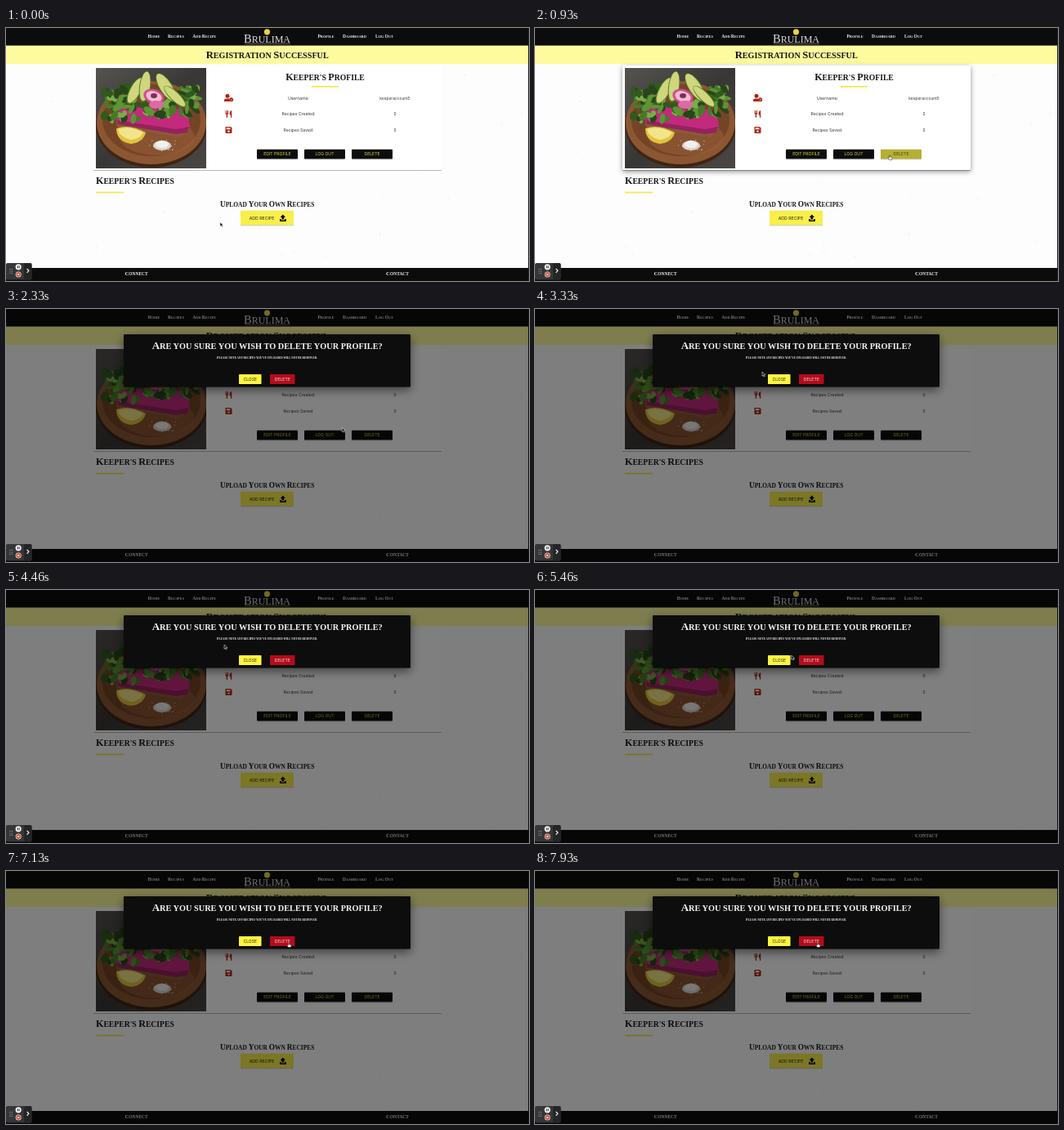
An HTML page that plays this animation: 640x310 px, repeating every 8000 ms.

```html
<!DOCTYPE html>
<html lang="en">
<head>
<meta charset="utf-8">
<title>Profile page</title>
<style>
html, body { margin: 0; width: 100%; height: 100%; overflow: hidden; background: #fdfdfd; }
svg { display: block; width: 640px; height: 310px; }
.serif { font-family: "Liberation Serif", serif; font-weight: bold; }
.sans { font-family: Inter, sans-serif; }
</style>
</head>
<body>
<svg id="stage" viewBox="0 0 640 310" xmlns="http://www.w3.org/2000/svg"></svg>
<script>
const YELLOW = '#f8ef4c', INK = '#0c0c0c', RED = '#b0240f';
const LOOP = 8000, OPEN = 1790;

let seed = 11;
const rnd = () => (seed = seed * 16807 % 2147483647) / 2147483647;
const many = (n, f) => Array.from({ length: n }, (_, i) => f(i)).join('');

const rect = (x, y, w, h, fill, more = '') =>
  `<rect x="${x}" y="${y}" width="${w}" height="${h}" fill="${fill}" ${more}/>`;
const oval = (x, y, rx, ry, fill, more = '') =>
  `<ellipse cx="${x}" cy="${y}" rx="${rx}" ry="${ry}" fill="${fill}" ${more}/>`;
const path = (d, fill, more = '') => `<path d="${d}" fill="${fill}" ${more}/>`;
const sans = (s, x, y, size, fill = '#333', more = '') =>
  `<text class="sans" x="${x}" y="${y}" font-size="${size}" fill="${fill}" text-anchor="middle" ${more}>${s}</text>`;

// Small capitals: capitals keep the full size, the rest is set smaller
const caps = (s, x, y, size, fill = '#161616', anchor = 'middle') => {
  const parts = s.match(/[A-Z]|[^A-Z]+/g).map(p => /[A-Z]/.test(p) ? p
    : `<tspan font-size="${(size * .8).toFixed(2)}">${p.toUpperCase()}</tspan>`);
  return `<text class="serif" x="${x}" y="${y}" font-size="${size}" fill="${fill}" text-anchor="${anchor}">${parts.join('')}</text>`;
};
const button = (s, x, y, w, h, bg, fg, id = '') =>
  rect(x, y, w, h, bg, `rx=".8" filter="url(#low)" ${id && `id="${id}"`}`) +
  sans(s, x + w / 2, y + h / 2 + 1.9, 5.1, fg, id && `id="${id}Text"`);

function texture() {
  return many(150, () => {
    const x = rnd() * 638, y = 46 + rnd() * 246, a = rnd() * 6.3, l = .4 + rnd() * rnd() * 5;
    return path(`M${x} ${y}l${Math.cos(a) * l} ${Math.sin(a) * l}`, 'none',
      `stroke="#999" stroke-width=".4" opacity="${.12 + rnd() * .3}"`);
  });
}

function photo() {
  const greens = ['#2f5a1c', '#477a28', '#5d9434', '#79ad48', '#26461a'];
  const leaves = (n, x, y, w, h) => many(n, i => {
    const cx = x + (rnd() - .5) * w, cy = y + (rnd() - .5) * h;
    return oval(cx, cy, 3 + rnd() * 5, 2 + rnd() * 2.5, greens[i % 5],
      `transform="rotate(${rnd() * 180} ${cx} ${cy})"`);
  });
  const slice = (x, y, rx, ry, turn) => `<g transform="translate(${x} ${y}) rotate(${turn})">` +
    oval(0, 0, rx, ry, '#557f2c') + oval(0, -.6, rx - 1, ry - 1, '#cfd67c') + '</g>';
  return `<g clip-path="url(#photo)">` +
    rect(110, 49, 135, 123, 'url(#table)') +
    oval(178, 119, 68, 52, '#3f2414') + oval(178, 116, 67, 51, '#8b5632') +
    oval(178, 113, 60, 44, '#754427') + oval(185, 134, 46, 22, '#965e38', 'opacity=".6"') +
    path('M134 107L146 97L222 104L225 124L213 134L136 121Z', '#8c5a3a') +
    path('M134 105L150 92L222 101L225 122L208 125L135 114Z', '#c32a7d') +
    path('M136 113L208 124L224 121L222 128L208 130L137 118Z', '#96215f') +
    leaves(48, 140, 91, 44, 42) + leaves(30, 216, 92, 37, 36) + leaves(22, 185, 100, 45, 14) +
    slice(158, 77, 7, 18, 28) + slice(170, 72, 7, 19, 8) + slice(196, 73, 8, 20, -32) + slice(207, 84, 6, 18, -46) +
    oval(181, 84, 13, 9, '#d04b91', 'transform="rotate(20 181 84)"') +
    oval(181, 84, 10, 6.5, '#f0bccd', 'transform="rotate(20 181 84)"') +
    oval(184, 94, 9, 5, '#da6ba3') + oval(181, 83, 4, 3, '#7f2b58') +
    path('M135 123Q151 117 171 128Q168 140 153 142Q135 139 135 123Z', '#dfc43c') +
    path('M137 124Q151 119 168 128Q164 136 153 137Q139 134 137 124Z', '#f1e58b') +
    oval(191, 144, 11, 6, '#d9d5d0') + oval(191, 142.5, 8, 4.5, '#f2f0ed') +
    many(22, () => oval(191 + (rnd() - .5) * 32, 144 + (rnd() - .5) * 15, .5, .5, '#eee')) + '</g>';
}

const icons = `<g fill="${RED}">` +
  oval(271, 83.3, 2.5, 2.5, RED) +
  path('M267 90V88.6Q267 86.5 270 86.5H273L275 90Z', RED) +
  oval(275.7, 87.8, 2.5, 2.5, RED) + path('M274.5 87.9l.9.9 1.6-1.8', 'none', 'stroke="#fff" stroke-width=".6"') +
  path('M268.5 101h.8v3h.7v-3h.8v3h.7v-3h.8v3.2q0 1.2-1.2 1.6v3.9h-1.4v-3.9q-1.2-.4-1.2-1.6ZM273.7 104.5q0-3 2.5-3.5v8.7h-1.3v-3.2h-1.2Z', RED) +
  path('M268.5 121H275L276.5 122.5V128Q276.5 129 275.5 129H269.5Q268.5 129 268.5 128Z', RED) +
  rect(269.8, 122.2, 4.6, 2, '#fff') + oval(272.5, 126.6, 1.2, 1.2, '#fff') + '</g>';

const uploadIcon = path('M338.8 228.5L342 232H340.2V234.6H337.4V232H335.6Z', INK) +
  path('M335 234H336.6V235.4H341V234H342.8V237H335Z', INK);

const page = rect(0, 0, 640, 310, '#fdfdfd') + texture() +
  rect(0, 21, 640, 23, '#fdfb9d') + caps('Registration Successful', 319.7, 36.5, 12.7) +
  rect(0, 0, 640, 21.5, INK) +
  [['Home', 181], ['Recipes', 208], ['Add Recipe', 242.7], ['Profile', 391.5], ['Dashboard', 426.5], ['Log Out', 463]]
    .map(([s, x]) => caps(s, x, 12.3, 5.5, '#eee')).join('') +
  oval(319.5, 4.8, 3.6, 3.6, '#f1cf3b') +
  `<text x="319.5" y="18.3" font-family="Liberation Serif, serif" font-size="14.5" fill="#ddd" text-anchor="middle">B<tspan font-size="12">RULIMA</tspan></text>` +
  rect(292, 19.3, 56, .5, '#aaa') +
  rect(107, 46, 426, 128, '#fff', 'id="cardLow" filter="url(#low)"') +
  rect(107, 46, 426, 128, '#fff', 'id="cardHigh" filter="url(#high)"') +
  `<g opacity=".5"><svg x="107" y="46" width="426" height="128" viewBox="107 46 426 128">${texture()}</svg></g>` +
  photo() +
  caps("Keeper's Profile", 390.5, 63.6, 12.1) + rect(374, 71, 33, 1.6, '#f5e63c') + icons +
  [['Username:', 'keeperaccount5', 87.6], ['Recipes Created:', '0', 107.2], ['Recipes Saved:', '0', 127]]
    .map(([k, v, y]) => sans(k, 358, y, 5.1) + sans(v, 476, y, 4.9)).join('') +
  button('EDIT PROFILE', 307, 148.7, 50, 11.6, INK, '#e3d93f') +
  button('LOG OUT', 365, 148.7, 50, 11.6, INK, '#e3d93f') +
  button('DELETE', 423, 148.7, 50, 11.6, INK, '#e3d93f', 'del') +
  caps("Keeper's Recipes", 110, 191, 12.1, '#161616', 'start') + rect(110, 200.7, 34, 1.6, '#f5e63c') +
  caps('Upload Your Own Recipes', 319.7, 218.5, 9.3) +
  rect(287, 223.8, 65, 17.4, YELLOW, 'rx=".8" filter="url(#low)"') + sans('ADD RECIPE', 313, 234.5, 5.2, '#222') + uploadIcon +
  rect(0, 294, 640, 16, INK) + caps('Connect', 159.5, 303, 6.8, '#eee') + caps('Contact', 479, 303, 6.8, '#eee') +
  rect(639, 0, 1, 310, '#222');

const modal = rect(144, 31, 351, 64.5, '#0b0c0c', 'rx=".8" filter="url(#deep)"') +
  caps('Are you sure you wish to delete your profile?', 319.7, 48.8, 12.9, '#f5f5f5') +
  caps("Please note any recipes you've uploaded will not be removed.", 319.5, 61.4, 4.2, '#eee') +
  button('CLOSE', 285, 80, 27.5, 12, '#fdf540', '#222') +
  button('DELETE', 323, 80, 30.5, 12, '#b20d1e', '#f3dede');

const recorder = rect(0, 288, 31.5, 20.5, '#343638', 'rx="2"') + rect(22, 288, 9.5, 20.5, '#232527', 'rx="2"') +
  many(6, i => oval(5 + i % 2 * 2.4, 295.5 + (i >> 1) * 2.5, .6, .6, '#bbb')) +
  oval(15.2, 292.8, 3.6, 3.6, '#f2f2f2') + rect(13.8, 291.3, 1, 3, '#333') + rect(15.7, 291.3, 1, 3, '#333') +
  oval(15.2, 302, 3.5, 3.5, '#e9d9d4') + oval(15.2, 302, 2.7, 2.7, '#c8452c') + rect(14.2, 301, 2, 2, '#fff') +
  path('M25.6 294.8l2.3 2.5-2.3 2.5', 'none', 'stroke="#fff" stroke-width="1.1"');

const pointers =
  path('M0 0V5.2L1.3 4.1L2.2 6L3.2 5.5L2.4 3.7H4Z', '#111', 'id="arrow" stroke="#fff" stroke-width=".5"') +
  path('M-.6 -1Q0 -1.7 .6 -1V1L2.7 1.6Q3.2 1.9 3 2.8L2.5 4.6H-.6L-2 2.3Q-1.8 1.5 -.6 2.2Z', '#fff', 'id="hand" stroke="#111" stroke-width=".5"');

const shadow = (id, dy, blur, alpha) =>
  `<filter id="${id}" x="-30%" y="-60%" width="160%" height="220%"><feDropShadow dx="0" dy="${dy}" stdDeviation="${blur}" flood-opacity="${alpha}"/></filter>`;

const stage = document.getElementById('stage');
stage.innerHTML = `<defs>${shadow('low', .7, .7, .4)}${shadow('high', 2, 3, .42)}${shadow('deep', 4, 6, .5)}
  <clipPath id="photo"><rect x="110" y="49" width="134.5" height="122.5"/></clipPath>
  <linearGradient id="table" x2="1" y2="1"><stop stop-color="#55534f"/><stop offset=".5" stop-color="#393735"/><stop offset="1" stop-color="#4a4643"/></linearGradient></defs>
  ${page}${rect(0, 0, 640, 310, '#000', 'id="shade"')}<g id="modal">${modal}</g>${recorder}
  <circle id="ring" r="7" fill="none" stroke="#b8321c" stroke-width="1.3"/><g id="pointer">${pointers}</g>`;

const $ = id => document.getElementById(id);
const set = (id, name, value) => $(id).setAttribute(name, value);
const ramp = (t, start, length) => Math.min(1, Math.max(0, (t - start) / length));
const easeOut = (u, n) => 1 - (1 - u) ** n;
const mix = (a, b, p) => `rgb(${a.map((v, i) => Math.round(v + (b[i] - v) * p))})`;

const moves = [[0, 262, 238], [250, 262, 238], [860, 434, 157], [2150, 434, 157], [2900, 278, 77],
  [3400, 278, 77], [4000, 267, 67], [4900, 267, 67], [5900, 346, 89], [LOOP, 346, 89]];

function pointerAt(t) {
  const i = moves.findIndex(m => m[0] > t), [t0, x0, y0] = moves[i - 1], [t1, x1, y1] = moves[i];
  const u = (t - t0) / (t1 - t0), p = u * u * (3 - 2 * u);
  return [x0 + (x1 - x0) * p, y0 + (y1 - y0) * p];
}

function draw(t) {
  const [x, y] = pointerAt(t);
  const inModal = t > 2200;
  const over = inModal
    ? y > 80 && y < 92 && (x > 285 && x < 312.5 || x > 323 && x < 353.5)
    : y > 148 && y < 161 && x > 423 && x < 473;
  set('pointer', 'transform', `translate(${x} ${y})`);
  set('hand', 'opacity', +over);
  set('arrow', 'opacity', +!over);

  const lift = easeOut(ramp(t, 680, 250), 2) * (1 - easeOut(ramp(t, 1900, 250), 2));
  set('cardHigh', 'opacity', lift);
  const glow = easeOut(ramp(t, 770, 300), 1.7) * (1 - easeOut(ramp(t, 1900, 300), 1.7));
  const dark = [12, 12, 12], bright = [244, 236, 66];
  set('del', 'fill', mix(dark, bright, glow));
  set('delText', 'fill', mix([227, 217, 63], dark, t < OPEN ? glow : 0));

  set('ring', 'cx', x + .5);
  set('ring', 'cy', y - .5);
  set('ring', 'opacity', +(t > 1660 && t < 2000));

  const u = ramp(t, OPEN, 250), p = easeOut(u, 3);
  set('shade', 'opacity', .5 * easeOut(u, 2));
  set('modal', 'opacity', p);
  set('modal', 'transform',
    `translate(319.5 ${63.2 - 18.6 * (1 - p)}) scale(${.8 + .2 * p}) translate(-319.5 -63.2)`);
}

const begin = performance.now();
function tick() {
  draw((performance.now() - begin) % LOOP);
  requestAnimationFrame(tick);
}
tick();
</script>
</body>
</html>
```
